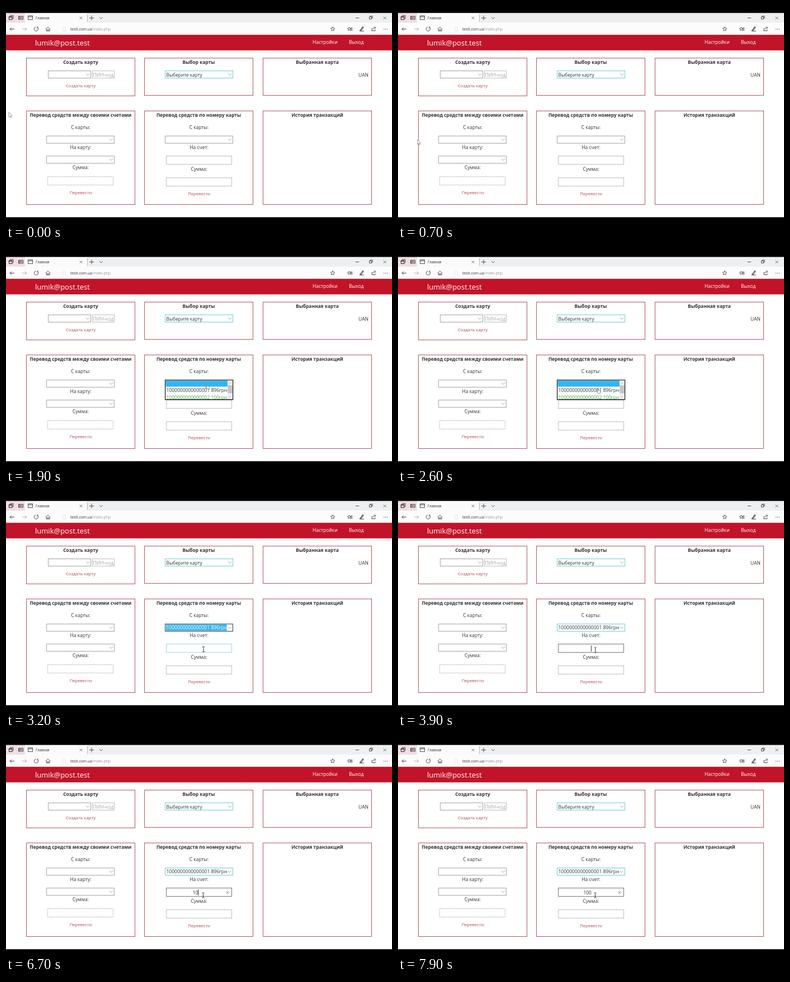
Animation of 690 by 388 pixels, one loop 8 s. Source, as an HTML page:

```html
<!DOCTYPE html>
<html lang="ru">
<head>
<meta charset="utf-8">
<style>
  html, body { margin: 0; width: 100%; height: 100%; overflow: hidden; background: #fff; }
  svg { display: block; width: 690px; height: 388px; }
  text { font: 8.5px "Open Sans", "Noto Sans", sans-serif; white-space: pre; }
</style>
</head>
<body>
<svg id="stage" viewBox="0 0 690 388" xmlns="http://www.w3.org/2000/svg"></svg>
<script>
const LOOP = 8000, STEP = 100;
const CYAN = '#70cdd6', BLUE = '#33b5f0', DARK = '#3c3c3c', GREY = '#a4a4a4', PALE = '#bebebe';
const WINE = '#b0585f', LINK = '#b04a56', INK = '#333';
const stage = document.getElementById('stage');

function add(tag, attrs, parent = stage) {
  const el = document.createElementNS(stage.namespaceURI, tag);
  for (const k in attrs) el.setAttribute(k, attrs[k]);
  parent.appendChild(el);
  return el;
}
const fill = (x, y, w, h, color, parent) => add('rect', { x, y, width: w, height: h, fill: color }, parent);
const frame = (x, y, w, h, color) =>
  add('rect', { x: x + .5, y: y + .5, width: w, height: h, fill: 'none', stroke: color });
const line = (d, color = DARK, width = .9, parent = stage, bg = 'none') =>
  add('path', { d, stroke: color, 'stroke-width': width, fill: bg }, parent);
function label(str, x, y, { size = 8.5, color = INK, anchor = 'start', weight = 400, parent = stage } = {}) {
  const el = add('text', { x, y, fill: color, 'text-anchor': anchor }, parent);
  el.style.fontSize = size + 'px';
  el.style.fontWeight = weight;
  el.textContent = str;
  return el;
}
const mid = (str, x, y, opts = {}) => label(str, x, y, { anchor: 'middle', ...opts });
const chevron = (x, y, color = '#888', r = 3) => line(`M${x - r} ${y - r / 2}l${r} ${r}l${r} ${-r}`, color, .8);
const cross = (x, y, r, parent) => line(`M${x - r} ${y - r}l${2 * r} ${2 * r}m0 ${-2 * r}l${-2 * r} ${2 * r}`, '#555', .8, parent);
function select(x, y, w, color) {
  const box = frame(x, y, w, 13, color);
  chevron(x + w - 5, y + 7);
  return box;
}
function star(cx, cy, r) {
  let d = '';
  for (let i = 0; i < 10; i++) {
    const a = i * Math.PI / 5, q = i % 2 ? r * .45 : r;
    d += `${i ? 'L' : 'M'}${(cx + q * Math.sin(a)).toFixed(2)} ${(cy - q * Math.cos(a)).toFixed(2)}`;
  }
  line(d + 'Z', DARK, .8);
}

function drawBrowser() {
  fill(0, 0, 690, 388, '#fff');
  fill(0, 12, 690, 18, '#eeeff1');
  fill(0, 12, 34, 18, '#eedfe2');
  fill(34, 12, 111, 18, '#fafafa');
  fill(0, 30, 690, 22, '#fcfcfc');
  fill(0, 0, 690, 12.5, '#000');
  fill(0, 379.4, 690, 9, '#000');

  line('M7.5 18v-1h5.5v5.5h-1.5');
  line('M5.5 19h5.5v5.5h-5.5zM5.5 20h5.5', '#402a2e', 1.1);
  line('M22.5 18.5h8v5.5h-8zM24 18.5v5.5M29.5 21.2h-4m1.6-1.6l-1.6 1.6l1.6 1.6', '#402a2e');
  line('M39.5 17.5h8v7h-8zM39.5 19.5h8');
  label('Главная', 53, 23.7, { size: 6.3, weight: 500 });
  cross(134, 21.5, 2.3);
  line('M145.5 15v13', '#b0b0b0');
  line('M149 21.5h8M153 17.5v8');
  chevron(170, 21.5, DARK);
  line('M625 21.5h6');
  line('M649.5 19.5h4v4h-4zM651 19v-1h4v4h-1');
  cross(677, 21.5, 2.5);

  line('M15 41.5h-8m3.2-3.2l-3.2 3.2l3.2 3.2');
  line('M29 41.5h8m-3.2-3.2l3.2 3.2l-3.2 3.2', '#aaa');
  line('M56.8 39a3.6 3.6 0 1 1-3.6-1.2M56.8 36.8v2.4h-2.4');
  line('M71 41.5l4-4l4 4M72.3 41v4h2v-2.6h1.6v2.6h2v-4');
  add('circle', { cx: 104, cy: 41.5, r: 3.2, fill: 'none', stroke: '#dcdcdc', 'stroke-width': .8 });
  const url = label('testt.com.ua', 115, 43.8, { size: 6.65 });
  add('tspan', { fill: '#999' }, url).textContent = '/index.php';
  star(584, 41.3, 4);
  star(613.5, 41.3, 3.3);
  line('M615.5 39.5h4M616 41.5h3.5M616 43.5h3.5');
  line('M632.5 44.5l5-7l1.5 1l-5 6.5zM635 45h5', DARK, 1.1);
  line('M654 40v4.5h6v-2M655.5 42c.5-2.5 2-3 5-3m-2-2l2.3 2l-2.3 2');
  for (const x of [675, 678, 681]) fill(x, 41, 1.2, 1.2, DARK);
}

function drawPage() {
  fill(0, 51.7, 690, 28, '#c11428');
  label('lumik@post.test', 52, 71.3, { size: 13, color: '#fff', weight: 500 });
  label('Настройки', 548, 68, { color: '#fff', weight: 500 });
  label('Выход', 613, 68, { color: '#fff', weight: 500 });

  const cards = [
    [36, 93, 68, 'Создать карту'], [247, 93, 67, 'Выбор карты'], [459, 93, 67, 'Выбранная карта'],
    [36, 188, 168, 'Перевод средств между своими счетами'],
    [247, 188, 168, 'Перевод средств по номеру карты'], [459, 188, 168, 'История транзакций']
  ];
  for (const [x, y, h, title] of cards) {
    frame(x, y, 194, h, WINE);
    mid(title, x + 97.5, y + (y < 100 ? 11 : 10.5), { size: 8.4, weight: 700 });
  }

  select(75, 116, 76, GREY);
  frame(154, 116, 39, 13, PALE);
  label('ПИН-код', 155.5, 127, { size: 8.7, color: '#a4a4a4' });
  mid('Создать карту', 133.5, 145.5, { size: 7.8, color: LINK });
  select(284, 116, 121, CYAN);
  label('Выберите карту', 286.5, 127, { size: 8.3 });
  label('UAN', 648, 126.5, { anchor: 'end' });

  const fields = [
    ['С карты:', 133.5, 220.5], ['На карту:', 133.5, 257], ['Сумма:', 133.5, 293.3],
    ['С карты:', 345, 220.5], ['На счет:', 345, 257], ['Сумма:', 345, 296.3]
  ];
  for (const [str, x, y] of fields) mid(str, x, y);
  select(72, 233, 121, GREY);
  select(72, 269, 121, GREY);
  frame(74, 306, 117, 15, PALE).setAttribute('stroke-dasharray', '3 1');
  frame(286, 308, 117, 15, PALE);
  mid('Перевести', 133.5, 337.5, { size: 7.7, color: LINK });
  mid('Перевести', 345, 340, { size: 7.7, color: LINK });
}

drawBrowser();
drawPage();

// Live form parts
const FIRST = '1000000000000001 896грн';
const account = frame(286, 269, 117, 15, PALE);
const typed = mid('', 338.7, 281);
const clear = add('g', {});
cross(396, 277.5, 2.2, clear);
const caret = fill(345, 272, .9, 11, '#222');
const from = select(284, 233, 121, GREY);
const mark = fill(286, 234.5, 108.5, 11, BLUE);
const chosen = label('', 286.5, 243);

const list = add('g', {});
add('rect', { x: 284.6, y: 233.6, width: 121, height: 35, fill: '#fff', stroke: '#222', 'stroke-width': 1.3 }, list);
fill(285.5, 234.5, 110.5, 11, BLUE, list);
label(FIRST, 286.5, 255.3, { parent: list });
label('1000000000000002 100грн', 286.5, 267.6, { color: '#3fae49', parent: list });
fill(396, 234.5, 9, 33.5, '#efefef', list);
fill(396.5, 243, 8.5, 14.5, '#c4c4c4', list);
line('M398.5 240l2-2l2 2M398.5 262.5l2 2l2-2', '#999', .7, list);
line('M285 268.6h120.6', '#222', 1.3, list);

const pointers = {
  arrow: add('g', {}),
  hand: add('g', {}),
  beam: add('g', {})
};
line('M0 0v8.5l2-1.8l1.4 3l1.3-.6l-1.3-2.9h2.7z', '#777', .7, pointers.arrow, '#fff');
line('M0 0q1-.8 1.4.3v3l3 .8q.9.3.7 1.5l-.6 3h-4l-2.3-3.2q0-1.2 1.8-.2z', '#555', .7, pointers.hand, '#fff');
line('M-2-4.5h1.5l.5.5l.5-.5h1.5M0-4v8M-2 4.5h1.5l.5-.5l.5.5h1.5', '#222', .9, pointers.beam);

const path = [
  [0, 5, 191], [200, 5, 191], [400, 1, 236], [600, 1, 236], [1100, 325, 274], [1300, 359, 241],
  [1900, 359, 241], [2200, 357, 248], [2700, 357, 249], [2800, 357, 250], [3100, 353, 279],
  [3700, 353, 279], [4200, 352.5, 282.5], [LOOP, 352.5, 282.5]
];
const blink = [[3800, 4500], [4900, 5100], [5400, 6300], [6500, 7300], [7700, 7900]];
const typing = [[5700, '1'], [6100, '10'], [6900, '100']];

function at(t) {
  const i = path.findIndex(p => p[0] > t), [t0, x0, y0] = path[i - 1], [t1, x1, y1] = path[i];
  const k = (t - t0) / (t1 - t0), e = k * k * (3 - 2 * k);
  return [x0 + (x1 - x0) * e, y0 + (y1 - y0) * e];
}
const show = (el, on) => { el.style.display = on ? '' : 'none'; };

function draw(t) {
  const open = t >= 1900 && t < 2800, picked = t >= 2800, focused = t >= 3800;
  const [x, y] = at(t);
  const overInput = y > 270 && x > 286;

  show(list, open);
  show(mark, picked && !focused);
  chosen.textContent = picked ? FIRST : '';
  chosen.setAttribute('fill', focused ? INK : '#fff');
  from.setAttribute('stroke', focused ? CYAN : picked ? DARK : t >= 1300 ? CYAN : GREY);
  account.setAttribute('stroke', focused ? '#777' : overInput ? '#a5d8df' : PALE);

  let value = '';
  for (const [start, str] of typing) if (t >= start) value = str;
  typed.textContent = value;
  show(clear, value);
  show(caret, blink.some(([a, b]) => t >= a && t < b));
  caret.setAttribute('x', value ? 338.5 + value.length * 2.43 : 345);

  const kind = overInput ? 'beam' : open ? 'hand' : 'arrow';
  for (const name in pointers) show(pointers[name], name === kind);
  pointers[kind].setAttribute('transform', `translate(${x.toFixed(2)} ${y.toFixed(2)})`);
}

const start = performance.now();
function tick() {
  const t = (performance.now() - start) % LOOP;
  draw(Math.floor(t / STEP) * STEP);
  requestAnimationFrame(tick);
}
tick();
</script>
</body>
</html>
```
